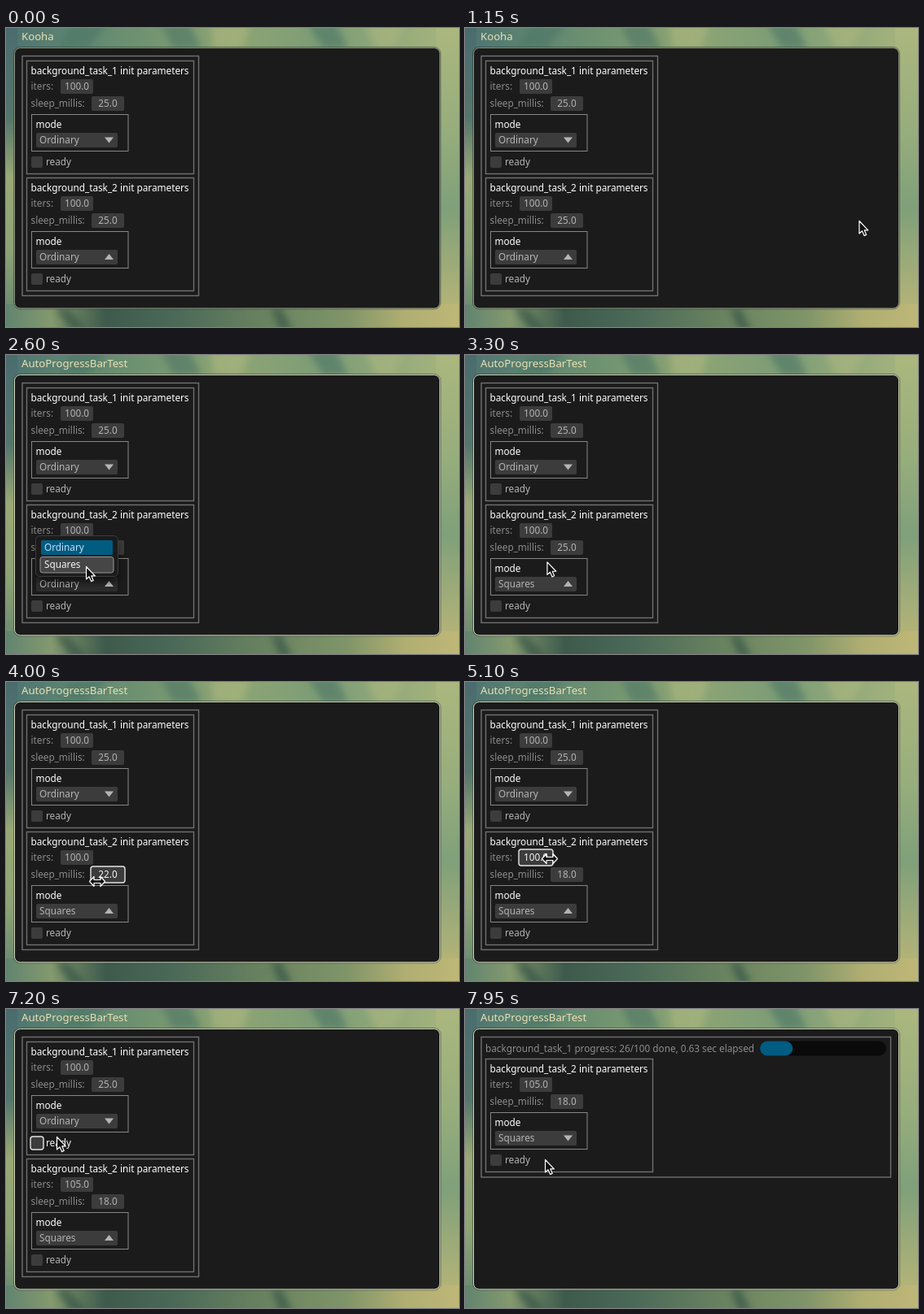
Animation of 556x368 px, one loop 8000 ms. Source, as an HTML page:

```html
<!DOCTYPE html>
<html lang="en">
<head>
<meta charset="utf-8">
<title>AutoProgressBarTest</title>
<style>
  html, body { margin: 0; width: 100%; height: 100%; overflow: hidden; background: #6f8f76; }
  svg { display: block; width: 556px; height: 368px; }
  text { font: 11.75px "Noto Sans", sans-serif; fill: #8c8c8c; white-space: pre; }
  .title { font-size: 13.2px; fill: #e9e0b4; }
  .strong { fill: #fff; }
  .value { fill: #b4b4b4; }
  .mid { text-anchor: middle; }
  .frame { fill: none; stroke: #868686; }
  .group { fill: none; stroke: #707070; stroke-width: 1.4; }
  .box { fill: #3c3c3c; }
  .halo { fill: #3c3c3c; stroke: #e4e4e4; stroke-width: 1.4; visibility: hidden; }
  .tri { fill: #b4b4b4; }
  .hot .halo { visibility: inherit; }
  .hot .value, .hot .tri { fill: #f4f4f4; }
  .open .box { fill: #2d2d2d; }
  .open .value, .open .tri { fill: #c8c8c8; }
  .pointer { fill: #111; stroke: #fff; stroke-width: 1.2; stroke-linejoin: round; }
</style>
</head>
<body>
<svg id="stage" viewBox="0 0 556 368">
  <defs>
    <linearGradient id="sky">
      <stop offset="0" stop-color="#4d7270"/>
      <stop offset=".15" stop-color="#5f8672"/>
      <stop offset=".3" stop-color="#6f9270"/>
      <stop offset=".5" stop-color="#8ea574"/>
      <stop offset=".7" stop-color="#7c9c76"/>
      <stop offset="1" stop-color="#a9b67e"/>
    </linearGradient>
    <linearGradient id="ground">
      <stop offset="0" stop-color="#61846f"/>
      <stop offset=".1" stop-color="#84996e"/>
      <stop offset=".22" stop-color="#3d5a4c"/>
      <stop offset=".38" stop-color="#4c6a58"/>
      <stop offset=".55" stop-color="#66805f"/>
      <stop offset=".75" stop-color="#7f9468"/>
      <stop offset=".88" stop-color="#b0ae72"/>
      <stop offset="1" stop-color="#beb777"/>
    </linearGradient>
    <linearGradient id="left" x2="0" y2="1">
      <stop offset="0" stop-color="#4a6c6e"/>
      <stop offset=".3" stop-color="#55766c"/>
      <stop offset=".5" stop-color="#9aa976"/>
      <stop offset=".75" stop-color="#8da274"/>
      <stop offset="1" stop-color="#61846f"/>
    </linearGradient>
    <linearGradient id="right" x2="0" y2="1">
      <stop offset="0" stop-color="#abb77e"/>
      <stop offset=".35" stop-color="#96ad7c"/>
      <stop offset=".6" stop-color="#7fa07a"/>
      <stop offset="1" stop-color="#beb777"/>
    </linearGradient>
    <filter id="soft" x="-20%" y="-20%" width="140%" height="140%"><feGaussianBlur stdDeviation="4"/></filter>
    <filter id="shade" x="-30%" y="-30%" width="160%" height="170%"><feGaussianBlur stdDeviation="5"/></filter>
  </defs>

  <rect width="556" height="368" fill="url(#sky)"/>
  <rect width="14" height="368" fill="url(#left)"/>
  <rect x="528" width="28" height="368" fill="url(#right)"/>
  <rect y="340" width="556" height="28" fill="url(#ground)"/>
  <g filter="url(#soft)" opacity=".6">
    <path d="M80 -5 H125 L100 25 H65Z M190 -5 H225 L240 25 H205Z M370 -5 H405 L420 25 H390Z" fill="#4c7565"/>
    <path d="M250 -5 H300 L290 25 H255Z M440 -5 H490 L475 25 H455Z" fill="#acb780"/>
    <path d="M60 345 H76 L100 372 H80Z M325 345 H338 L352 372 H336Z" fill="#2f4d42"/>
  </g>

  <text id="title" class="title" x="19" y="15"></text>
  <rect x="9.5" y="23.5" width="524" height="322.5" rx="8" fill="none" stroke="#1d2a22" stroke-opacity=".5"/>
  <rect id="win" x="10.5" y="24.5" width="522" height="320.5" rx="7" fill="#1b1b1b"/>
  <rect id="outer" class="group" x="20" y="34.5"/>

  <g id="progress">
    <text id="status" x="25" y="53"></text>
    <rect x="362" y="39.5" width="155" height="18" rx="9" fill="#0a0a0a"/>
    <rect id="fill" x="362" y="39.5" height="18" rx="9" fill="#005c80"/>
  </g>

  <g id="tasks"></g>

  <g id="popup">
    <rect x="39" y="230" width="98" height="50" rx="5" fill="#000" opacity=".6" filter="url(#shade)"/>
    <rect x="36.5" y="222.5" width="101" height="50" rx="5" fill="#1b1b1b" stroke="#3c3c3c"/>
    <rect x="43" y="228" width="88" height="18" rx="2" fill="#005c80"/>
    <text x="47" y="241" style="fill:#c0deff">Ordinary</text>
    <g id="option">
      <rect class="halo" x="42" y="248.5" width="90" height="19.5" rx="3" style="fill:#464646;stroke:#969696;stroke-width:1"/>
      <text class="value" x="47" y="262">Squares</text>
    </g>
  </g>

  <path id="arrow" class="pointer" d="M.5 .5 V16 L4 12.8 L6.6 18.6 L9.2 17.4 L6.8 11.8 H11.4Z"/>
  <path id="resize" class="pointer" d="M-9.5 .5 L-4 -5.5 V-1.5 H4 V-5.5 L9.5 .5 L4 6.5 V2.5 H-4 V6.5Z"/>
</svg>

<script>
const LOOP = 8000, FOCUS = 2050, OPEN = 2150, PICK = 3050, LAYOUT = 7300, START = 7320;
const $ = id => document.getElementById(id);

// time, x, y of the pointer
const path = [
  [1000, 562, 210], [1500, 300, 300], [1850, 127, 279], [2250, 126, 281],
  [2600, 98, 260], [2850, 97, 256], [3250, 97, 256], [3600, 121, 245],
  [3800, 121, 245], [4000, 112, 245], [4500, 100, 246], [4750, 100, 246],
  [4950, 104, 217], [5100, 104, 217], [5400, 121, 218], [5600, 121, 218],
  [5750, 267, 276], [6000, 267, 276], [6250, 231, 251], [6700, 90, 140],
  [6800, 72, 146], [6900, 60, 158], [7100, 60, 158], [7200, 62, 157],
  [7350, 62, 157], [7750, 96, 181], [7950, 98, 185]
];

function pointerAt(t) {
  const i = path.findIndex(k => k[0] > t);
  if (i === 0) return [path[0][1], path[0][2]];
  if (i < 0) return path[path.length - 1].slice(1);
  const [t0, x0, y0] = path[i - 1], [t1, x1, y1] = path[i];
  const p = (t - t0) / (t1 - t0);
  return [x0 + (x1 - x0) * p, y0 + (y1 - y0) * p];
}

// hit areas in the first group's coordinates: left, top, right, bottom
const areas = {
  iters: [67, 63, 107, 81],
  sleep: [105, 84, 145, 102],
  mode: [37, 129, 137, 147.5],
  ready: [31, 155, 81, 175]
};

// a widget background and the larger outline it gets under the pointer
const box = (x, y, w, h) => `
  <rect class="box" x="${x}" y="${y}" width="${w}" height="${h}" rx="2"/>
  <rect class="halo" x="${x - 1}" y="${y - 1}" width="${w + 2}" height="${h + 2}" rx="3"/>`;

function makeTask(n) {
  const g = document.createElementNS('http://www.w3.org/2000/svg', 'g');
  g.innerHTML = `
    <rect class="group" x="25.5" y="40.5" width="205" height="139"/>
    <text class="strong" x="30.5" y="57">background_task_${n} init parameters</text>
    <text x="30.5" y="76">iters:</text>
    <g data-part="iters">${box(67, 63, 40, 18)}<text class="value mid" x="87" y="76"></text></g>
    <text x="30.5" y="97">sleep_millis:</text>
    <g data-part="sleep">${box(105, 84, 40, 18)}<text class="value mid" x="125" y="97"></text></g>
    <rect class="frame" x="31.5" y="106.5" width="118.5" height="45"/>
    <text class="strong" x="36.5" y="123">mode</text>
    <g data-part="mode">${box(37, 129, 100, 18)}<text class="value" x="41" y="142"></text><path class="tri"/></g>
    <g data-part="ready">${box(31, 158, 14, 14)}<text class="value" x="49" y="169">ready</text></g>`;
  $('tasks').append(g);
  const parts = {};
  g.querySelectorAll('[data-part]').forEach(e => parts[e.dataset.part] = e);
  return { g, parts };
}

function drawTask({ g, parts }, s) {
  g.setAttribute('transform', `translate(0 ${s.dy})`);
  for (const name in parts) {
    parts[name].setAttribute('class', s.hot === name ? 'hot' : s.open && name === 'mode' ? 'open' : '');
    if (name !== 'ready') parts[name].querySelector('text').textContent = s[name];
  }
  parts.mode.querySelector('path').setAttribute('d', s.up ? 'M121 141 H132 L126.5 134Z' : 'M121 134.5 H132 L126.5 141.5Z');
}

function hitTest(x, y, dy) {
  return Object.keys(areas).find(k => {
    const [l, t, r, b] = areas[k];
    return x >= l && x <= r && y - dy >= t && y - dy <= b;
  });
}

const show = (e, on) => e.setAttribute('visibility', on ? 'visible' : 'hidden');
const first = makeTask(1), second = makeTask(2);

function draw(t) {
  const [x, y] = pointerAt(t);
  const running = t >= LAYOUT, focused = t >= FOCUS, open = t >= OPEN && t < PICK;
  const dy = running ? 21 : 144;

  $('title').textContent = focused ? 'AutoProgressBarTest' : 'Kooha';
  $('win').setAttribute('stroke', focused ? '#d5d9bd' : '#8d9480');
  $('outer').setAttribute('width', running ? 502.5 : 216.5);
  $('outer').setAttribute('height', running ? 172.5 : 295);

  const live = t >= 1900 && !open;
  const hot1 = live && !running ? hitTest(x, y, 0) : null;
  let hot2 = live ? hitTest(x, y, dy) : null;
  if (t >= 3800 && t < 4750) hot2 = 'sleep';
  if (t >= 5100 && t < 5600) hot2 = 'iters';

  // dragged values follow the pointer
  const sleep = t < 3800 ? 25 : t < 4500 ? Math.round(25 - (121 - x) / 3) : 18;
  const iters = t < 5100 ? 100 : t < 5400 ? Math.round(100 + (x - 104) / 3.4) : 105;

  show(first.g, !running);
  drawTask(first, { dy: 0, iters: '100.0', sleep: '25.0', mode: 'Ordinary', hot: hot1 });
  drawTask(second, {
    dy, open, hot: hot2, up: !running,
    iters: iters.toFixed(1), sleep: sleep.toFixed(1),
    mode: t < PICK ? 'Ordinary' : 'Squares'
  });

  show($('popup'), open);
  $('option').setAttribute('class', open && y > 247 && y < 269 ? 'hot' : '');

  show($('progress'), running);
  const elapsed = Math.max(0, t - START);
  const done = Math.min(100, Math.floor(elapsed / 25 + 1e-6) + 1);
  $('status').textContent = `background_task_1 progress: ${done}/100 done, ${(elapsed / 1000).toFixed(2)} sec elapsed`;
  $('fill').setAttribute('width', Math.max(18, 155 * done / 100));

  const dragging = hot2 === 'sleep' || hot2 === 'iters';
  show($('arrow'), !dragging);
  show($('resize'), dragging);
  for (const id of ['arrow', 'resize']) $(id).setAttribute('transform', `translate(${x} ${y})`);
}

const origin = performance.now();
function tick() {
  const t = (performance.now() - origin) % LOOP;
  draw(Math.floor(t / 50) * 50);
  requestAnimationFrame(tick);
}
tick();
</script>
</body>
</html>
```
